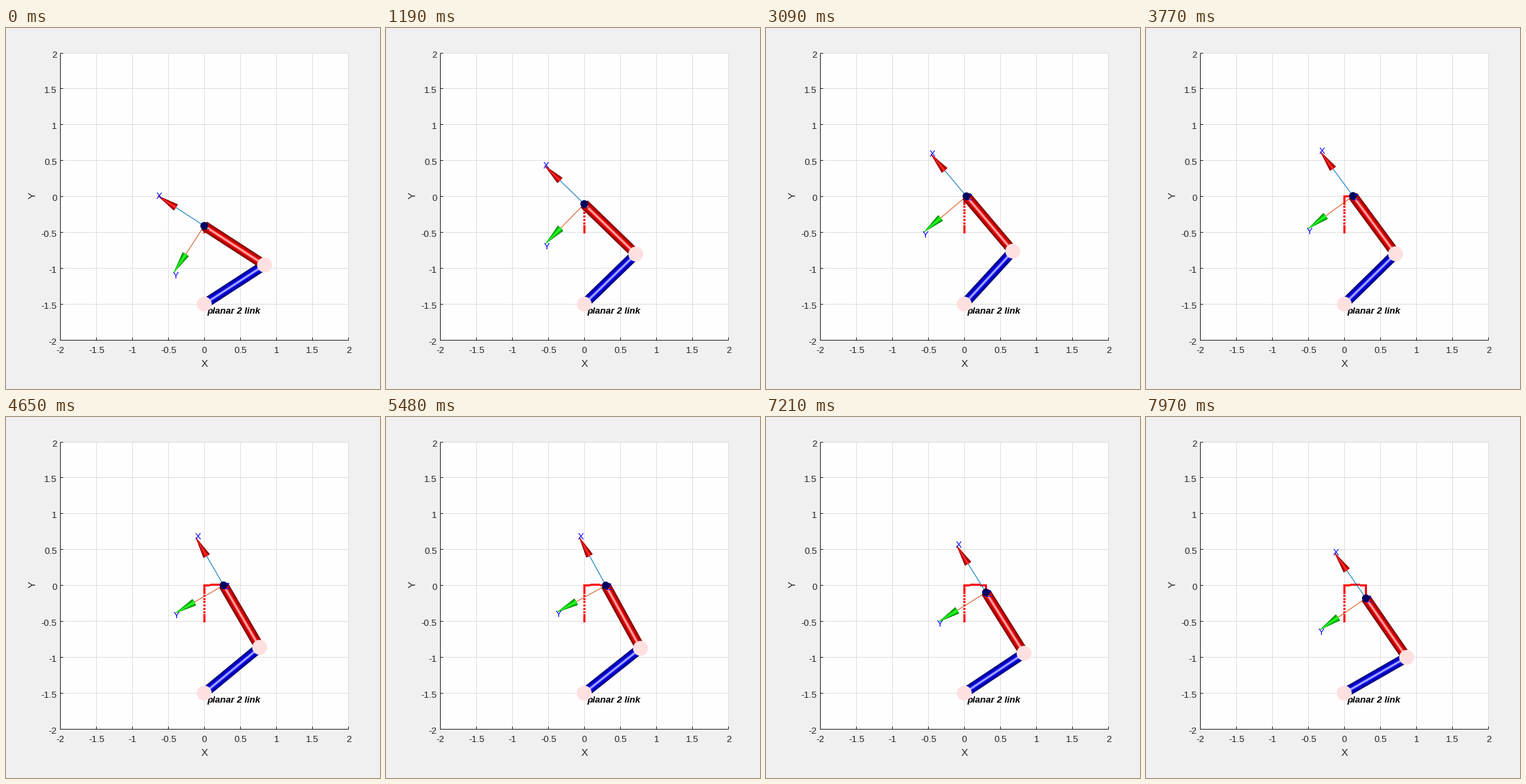
Write a matplotlib script that moves like this. It is 540 by 522 pixels and loops after 8000 ms.

```python
import numpy as np
import matplotlib.pyplot as plt
from matplotlib.animation import FuncAnimation
from matplotlib.collections import LineCollection, PolyCollection

W, H, DPI = 540, 522, 100
LOOP, TICK = 8000, 40
PX = 72 / DPI                       # one pixel in points
INK, GRID, LABEL = "#262626", "#dfdfdf", "#0000ff"

plt.rcParams["font.family"] = "Liberation Sans"
fig = plt.figure(figsize=(W / DPI, H / DPI), dpi=DPI, facecolor="#f0f0f0")
ax = fig.add_axes([0, 0, 1, 1])
ax.set(xlim=(0, W), ylim=(H, 0))
ax.axis("off")


def to_px(p):
    p = np.asarray(p, float)
    return np.stack([286.2 + 104 * p[..., 0], 243.6 - 103.75 * p[..., 1]], -1)


def pixel(p):
    """Centre of the pixel that holds p."""
    return np.floor(p) + 0.5


def line(xs, ys, color, width=1, z=1):
    return ax.plot(xs, ys, color=color, lw=width * PX, zorder=z,
                   solid_capstyle="butt", snap=False)[0]


def text(x, y, s, size=13.3, color=INK, z=2, **kw):
    kw = {"ha": "center", "va": "center_baseline", **kw}
    return ax.text(x, y, s, fontsize=size * PX, color=color, zorder=z, **kw)


# ---- plot box, grid and labels ----
(L, B), (R, T) = pixel(to_px([(-2, -2), (2, 2)]))
ax.add_patch(plt.Rectangle((L, T), R - L, B - T, fc="#fefefe", ec="none", zorder=0))
for v in np.arange(-2, 2.1, 0.5):
    x, y = pixel(to_px((v, v)))
    line([x, x], [T, B], GRID)
    line([L, R], [y, y], GRID)
    line([x, x], [B, B - 4], INK, z=1.5)
    line([L, L + 4], [y, y], INK, z=1.5)
    text(x, 466, f"{v:g}")
    text(73.5, y + 2, f"{v:g}", ha="right")
line([L, L], [T, B + 0.5], INK, z=1.5)
line([L, R], [B, B], INK, z=1.5)
text(287, 484.6, "X", 14.7)
text(38.5, 242.2, "Y", 14.7, rotation=90, va="center")
text(290.6, 409, "planar 2 link", color="black", z=6, ha="left",
     weight="bold", style="italic")

# ---- arm kinematics: joint-space quintic moves between waypoints ----
BASE = np.array([0, -1.5])
STEPS = 20


def joints(p):
    d = np.array(p) - BASE
    bend = np.arccos(np.hypot(*d) / 2)
    return np.array([np.arctan2(d[1], d[0]) - bend, 2 * bend])


WAY = [joints(p) for p in [(0, -0.5), (0, 0), (0.3, 0), (0.3, -0.2)]]


def pose(n):
    seg, k = divmod(n, STEPS)
    t = k / STEPS
    s = t**3 * (10 - 15 * t + 6 * t * t)
    q1, q2 = WAY[seg] + s * (WAY[seg + 1] - WAY[seg])
    elbow = BASE + [np.cos(q1), np.sin(q1)]
    axis = np.array([np.cos(q1 + q2), np.sin(q1 + q2)])
    return elbow, elbow + axis, axis


# runs of evenly spaced steps: first ms, last ms, count
RUNS = [(0, 600, 5), (890, 2070, 9), (2360, 3500, 9), (3770, 4650, 7),
        (4930, 5480, 5), (5770, 6610, 7), (6910, 7970, 8)]
TIMES = np.concatenate([np.linspace(*r) for r in RUNS])
FIRST = 6
PATH = to_px([pose(n)[1] for n in range(FIRST + len(TIMES))])
SQUARE = 1.5 * np.array([(-1, -1), (1, -1), (1, 1), (-1, 1)])
DOTS = pixel(PATH)[:, None] + SQUARE

# ---- shaded parts, built from nested layers ----
LAYERS = np.linspace(1, 0.06, 16)


def shades(rgb, gloss):
    n = np.sqrt(1 - LAYERS**2 * 0.96)[:, None]
    body = np.array(rgb) * (0.25 + 0.62 * n)
    return np.clip(body + gloss * n**36, 0, 1)


def rod(rgb, z):
    return ax.add_collection(LineCollection(
        [], colors=shades(rgb, 0.8), linewidths=14.4 * LAYERS * PX,
        capstyle="butt", zorder=z), autolim=False)


def set_rod(r, a, b):
    r.set_segments([[a, b]] * len(LAYERS))


def polys(colors, z):
    return ax.add_collection(PolyCollection(
        [], facecolors=colors, edgecolors="none", snap=False, zorder=z),
        autolim=False)


def set_arrow(c, shaft, label, o, d):
    tip, foot = o + 80 * d, o + 49 * d
    side = np.array([-d[1], d[0]]) * 5.3
    c.set_verts([[tip, foot + side * w, foot - side * w] for w in LAYERS])
    shaft.set_data(*zip(o, foot))
    label.set_position(o + 83 * d + [-0.3, 1.4])


def ball(r, color, z):
    return ax.add_patch(plt.Circle((0, 0), r, fc=color, ec="none", zorder=z))


trail = polys("#ff0000", 3)
lower, upper = rod((0, 0, 1), 7), rod((1, 0, 0), 8)
cone_x, cone_y = (polys(shades(c, 0.25), 5) for c in [(1, 0, 0), (0, 1, 0)])
shaft_x, shaft_y = line([], [], "#0072bd", z=4), line([], [], "#d95319", z=4)
name_x, name_y, name_z = (text(0, 0, s, color=LABEL, z=9, ha="left") for s in "XYZ")
z_foot = line([], [], "#300030", z=9)
ball(10.8, "#ffe0e0", 10).center = to_px(BASE)
knee, hand = ball(10.8, "#ffe0e0", 10), ball(5.6, "#000060", 11)


def draw(i):
    now = i * TICK + TICK - 1
    n = FIRST + int(np.searchsorted(TIMES, now, side="right")) - 1
    elbow, end, axis = pose(n)
    e, o, b = to_px(elbow), to_px(end), to_px(BASE)
    set_rod(lower, b, e)
    set_rod(upper, e, o)
    knee.center, hand.center = e, o
    trail.set_verts(DOTS[:n])
    dx = axis * [1, -1]
    dy = np.array([-axis[1], -axis[0]])
    set_arrow(cone_x, shaft_x, name_x, o, dx)
    set_arrow(cone_y, shaft_y, name_y, o, dy)
    # the Z label only clears the upper link after the first move
    name_z.set_visible(n > STEPS)
    name_z.set_position(o + [0, 1.5])
    z_foot.set_visible(n <= STEPS)
    z_foot.set_data(o[0] + np.array([1, 7]), [o[1] + 5.5] * 2)
    return []


anim = FuncAnimation(fig, draw, frames=LOOP // TICK, interval=TICK,
                     init_func=lambda: draw(0), repeat=True, repeat_delay=0)
plt.show()
```
